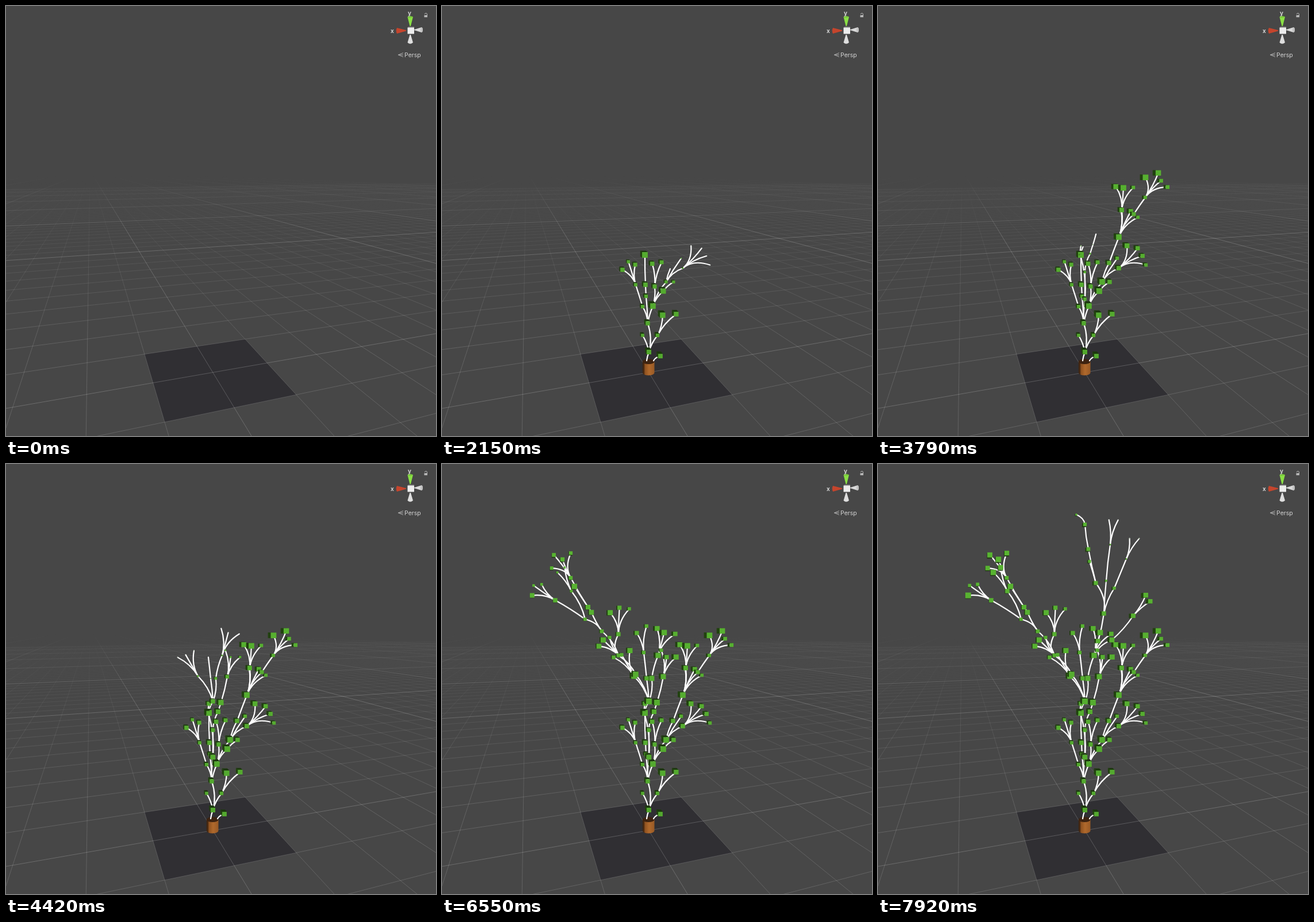
These frames come from a looping animation (748x748 px, 7.99 s). An HTML page with a canvas:

```html
<!DOCTYPE html>
<html lang="en">
<head>
<meta charset="utf-8">
<title>Growing tree</title>
<style>
  html, body { margin: 0; width: 100%; height: 100%; overflow: hidden; background: #474747; }
  canvas, svg { position: absolute; left: 0; top: 0; width: 748px; height: 748px; }
  text { fill: #d2d2d2; font-family: Inter, Roboto, sans-serif; }
</style>
</head>
<body>
<canvas id="floor" width="748" height="748"></canvas>
<canvas id="tree" width="748" height="748"></canvas>
<svg viewBox="0 0 748 748">
  <path d="M698.5 19Q703 16 708 19L704 35H702.5Z" fill="#8ae045"/>
  <path d="M698.5 19Q703 16 708 19Q703 22 698.5 19Z" fill="#79c63c"/>
  <path d="M680 38Q677.5 43 680 48L696 43.5V42Z" fill="#c5452d"/>
  <path d="M723 37Q727 41 723 46L710 42V41Z" fill="#d9d9d9"/>
  <ellipse cx="723" cy="41.5" rx="2" ry="4.3" fill="#c2c2c2"/>
  <path d="M702.5 50H704L708 63.5Q703 68 698.5 63.5Z" fill="#dedede"/>
  <path d="M698.5 37.500H710V48.5H698.5Z" fill="#ededed"/>
  <path d="M698.5 37.5L700 36.5H710V37.5Z" fill="#bdbdbd"/>
  <text x="699" y="16" font-size="10" font-weight="700">y</text>
  <text x="669" y="46.5" font-size="10" font-weight="700">x</text>
  <path d="M727.5 16H733V19.5H727.5Z" fill="#bbb"/>
  <path d="M728.5 14.5Q728.5 12.5 730.5 12.5T732.5 14.5V16" fill="none" stroke="#bbb"/>
  <path d="M691 81.5L682.5 85L691 88.5M682.5 85H691" fill="none" stroke="#bbb" stroke-width=".9"/>
  <text x="693" y="89" font-size="10.5">Persp</text>
</svg>
<script>
const LOOP = 7990;
const STEP = 67;
const BURSTS = [400, 1200, 2020, 2820, 3650, 4490, 5300, 6130, 6960, 7780];
const SPAN = 0.22;                  // growth time of one twig, in bursts
const LEAF_SPAN = 0.9;
const FAN = 20 * Math.PI / 180;     // angle between neighbouring tips
const REACH = 42;
const DEPTH = { x: 146, y: 286 };   // vanishing points on the horizon
const SIDE = { x: 2380, y: 286 };
const CENTRE = { x: 359.8, y: 637.4 };
const A = 0.049, B = 0.1484;

const floor = document.getElementById('floor').getContext('2d');
const ctx = document.getElementById('tree').getContext('2d');

const clamp = x => Math.max(0, Math.min(1, x));
const mix = (a, b, p) => a + (b - a) * p;

function polygon(c, points, fill) {
  c.beginPath();
  points.forEach(([x, y]) => c.lineTo(x, y));
  c.closePath();
  c.fillStyle = fill;
  c.fill();
}

/* ---- floor ---- */
function project(u, v) {
  const w = 1 + A * u + B * v;
  return ['x', 'y'].map(k => (CENTRE[k] + A * u * SIDE[k] + B * v * DEPTH[k]) / w);
}

function fade(stops) {
  const g = floor.createLinearGradient(0, 0, 0, 748);
  stops.forEach(([y, a]) => g.addColorStop(y / 748, `rgba(255,255,255,${a})`));
  return g;
}

function drawFloor() {
  const minor = fade([[300, 0], [340, .016], [400, .05], [480, .09], [600, .15]]);
  const major = fade([[295, 0], [340, .07], [400, .19], [600, .2]]);
  polygon(floor, [[-1, 1], [1, 1], [1, -1], [-1, -1]].map(p => project(...p)), '#302f33');
  const line = (n, p, q) => {
    floor.strokeStyle = n % 10 ? minor : major;
    floor.beginPath();
    floor.moveTo(...p);
    floor.lineTo(...q);
    floor.stroke();
  };
  for (let n = -40; n <= 70; n++) {
    line(n, project(n, (-.9 - A * n) / B), project(n, 300));
    if (n > -30) line(n, project((-.9 - B * n) / A, n), project(400, n));
  }
}

/* ---- tree ---- */
const twigs = [];

// Repeatable noise in 0..1 for a place on the stage.
function noise(x, y) {
  const n = Math.sin(x * 12.9898 + y * 78.233) * 43758.5453;
  return n - Math.floor(n);
}

// A twig leaves along the heading (0 is up) and bends towards its end.
function addTwig(start, from, to, heading) {
  const pull = Math.hypot(to[0] - from[0], to[1] - from[1]) * .5;
  const bend = [from[0] + Math.sin(heading) * pull, from[1] - Math.cos(heading) * pull];
  twigs.push({ start, end: start + SPAN, from, bend, to, size: 5.5 + 4.5 * noise(...to) });
}

function addFan(start, [x, y, count = 0], heading) {
  for (let i = 0; i < count; i++) {
    const seed = noise(x + i, y);
    const angle = heading + (i - (count - 1) / 2) * FAN + (seed - .5) * .15;
    const reach = REACH + (seed - .5) * 16;
    addTwig(start, [x, y], [x + Math.sin(angle) * reach, y - Math.cos(angle) * reach], heading);
  }
}

// A limb climbs from knot to knot [x, y, tips]; each knot opens a fan of tips.
function limb(start, ...knots) {
  let heading;
  for (let i = 1; i < knots.length; i++) {
    const from = knots[i - 1], to = knots[i];
    const chord = Math.atan2(to[0] - from[0], from[1] - to[1]);
    addTwig(start, from, to, heading ?? chord / 2);
    start += SPAN;
    heading = chord;
    addFan(start, to, heading);
  }
}

// lower crown
limb(0, [368, 617], [380, 609]);
limb(0, [356, 617], [360, 602], [358, 552], [349, 523], [337, 485, 3]);
limb(.2, [360, 602], [349, 573]);
limb(.2, [360, 602], [375, 573, 2]);
limb(.5, [358, 552], [367, 522], [370, 488, 2]);
limb(.7, [358, 552], [355, 505], [354, 485], [353, 433]);
limb(1.2, [367, 522], [385, 496], [403, 480]);
// right limb
limb(1.55, [367, 522], [390, 480, 1], [419, 456, 4]);
limb(2.1, [390, 480], [402, 447], [419, 402, 3], [424, 355, 3]);
limb(2.65, [419, 402], [445, 362], [465, 333, 4]);
// middle
limb(3.42, [357, 545], [360, 510], [352, 433], [353, 417]);
limb(3.5, [360, 510], [360, 463], [369, 431], [374, 415], [385, 370, 3]);
limb(4.1, [352, 433], [360, 413], [365, 373], [376, 333, 3]);
limb(4.5, [360, 413], [334, 369, 3]);
limb(4.6, [360, 413], [356, 373], [351, 328, 2]);
// left limb
limb(5.2, [360, 413], [337, 366], [307, 333, 3], [307, 296, 3]);
limb(5.8, [307, 333], [278, 291], [260, 258], [254, 249, 1], [224, 198, 4]);
limb(6.2, [278, 291], [249, 270], [197, 237, 3]);
limb(6.8, [249, 270], [225, 221, 2]);
// top
limb(7.59, [376, 333], [407, 306], [444, 264, 2]);
limb(7.59, [376, 333], [383, 308], [393, 260], [379, 207, 1], [366, 148], [360, 105], [345, 88]);
limb(8.55, [393, 260], [397, 203], [404, 140, 2]);
limb(8.5, [393, 260], [411, 216], [432, 165, 2]);

// Growth advances in bursts of twelve even steps with a rest between them.
function growth(t) {
  const i = BURSTS.findLastIndex(start => t >= start);
  if (i < 0) return 0;
  const step = Math.floor((t - BURSTS[i] + 8) / STEP) + 1;
  return Math.min(i + Math.min(step, 12) / 12, 9.25);
}

function drawTwig({ from, bend, to }, p) {
  const mid = [0, 1].map(k => mix(from[k], bend[k], p));
  const tip = [0, 1].map(k => mix(mid[k], mix(bend[k], to[k], p), p));
  ctx.beginPath();
  ctx.moveTo(from[0], from[1]);
  ctx.quadraticCurveTo(...mid, ...tip);
  ctx.stroke();
}

// A cube whose hidden edges run to the depth vanishing point.
function drawLeaf([x, y], size) {
  const h = size / 2, k = size * .0016;
  const dx = (DEPTH.x - x) * k, dy = (DEPTH.y - y) * k;
  const sx = x + Math.sign(dx) * h, sy = y + Math.sign(dy) * h;
  polygon(ctx, [[sx, y - h], [sx, y + h], [sx + dx, y + h + dy], [sx + dx, y - h + dy]], '#21420f');
  polygon(ctx, [[x - h, sy], [x + h, sy], [x + h + dx, sy + dy], [x - h + dx, sy + dy]], '#1c380e');
  ctx.fillStyle = `hsl(102 57% ${mix(46, 42, clamp(y / 600))}%)`;
  ctx.fillRect(x - h, y - h, size, size);
}

const bark = ctx.createLinearGradient(349, 0, 369.5, 0);
[[0, '#3a210f'], [.12, '#4f2e13'], [.2, '#8f5220'], [.55, '#b0692c'], [1, '#985a26']]
  .forEach(s => bark.addColorStop(...s));

function drawPot() {
  ctx.fillStyle = bark;
  ctx.beginPath();
  ctx.ellipse(359.2, 638, 10.3, 4.5, 0, 0, Math.PI);
  ctx.lineTo(348.9, 618);
  ctx.lineTo(369.5, 618);
  ctx.fill();
  ctx.fillStyle = '#3d2311';
  ctx.beginPath();
  ctx.ellipse(359.2, 618.5, 10.3, 4.5, 0, 0, 7);
  ctx.fill();
}

function render(t) {
  ctx.clearRect(0, 0, 748, 748);
  if (t < 70) return;
  drawPot();
  const g = growth(t);
  ctx.strokeStyle = '#fff';
  ctx.lineWidth = 2.2;
  ctx.lineCap = 'round';
  const alive = twigs.filter(w => g > w.start);
  alive.forEach(w => drawTwig(w, clamp((g - w.start) / SPAN)));
  alive.forEach(w => {
    const size = w.size * clamp((g - w.end) / LEAF_SPAN);
    if (size > 0) drawLeaf(w.to, size);
  });
}

function tick() {
  render(performance.now() % LOOP);
  requestAnimationFrame(tick);
}

drawFloor();
tick();
</script>
</body>
</html>
```
